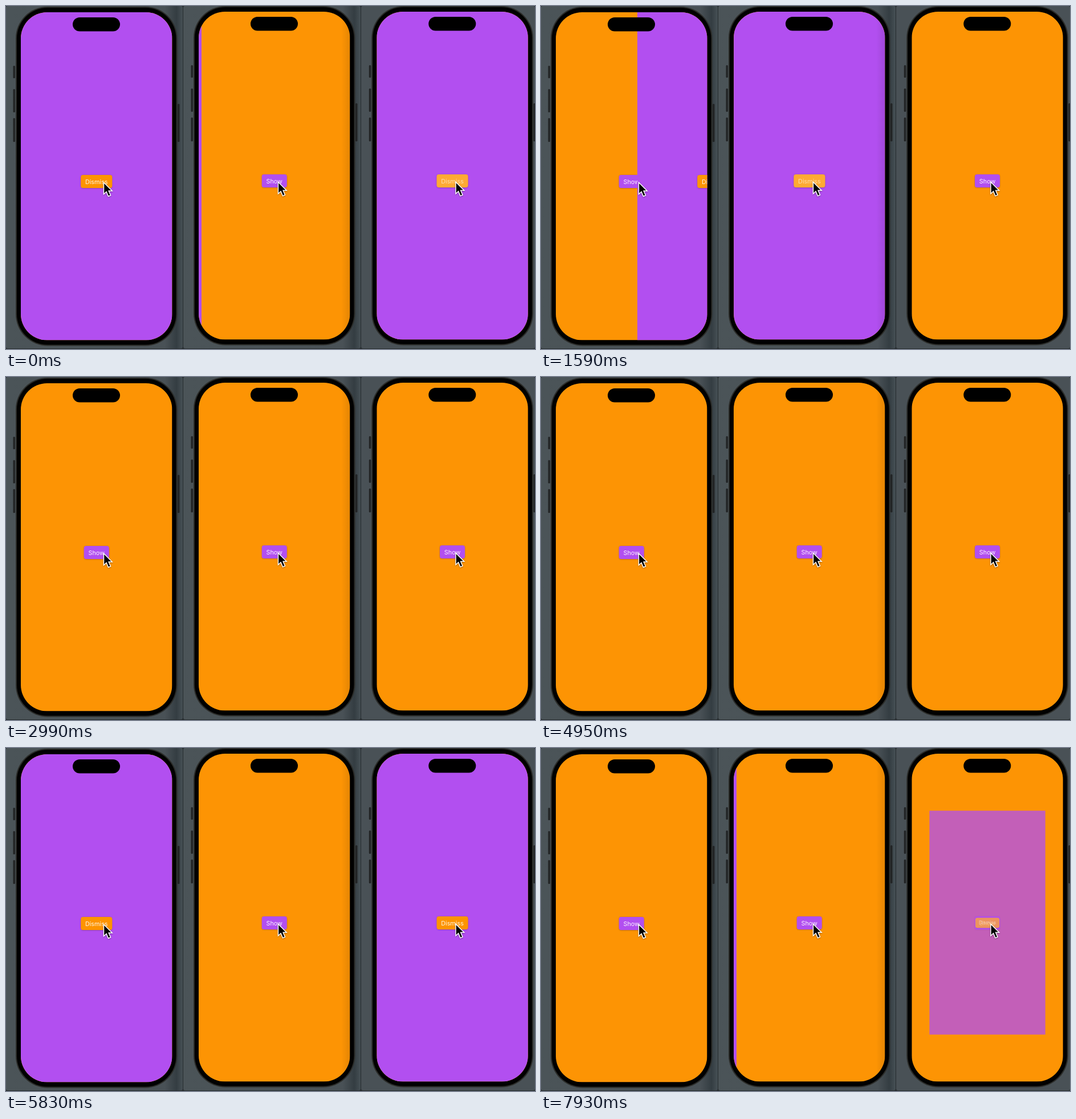
These frames come from a looping animation (928 px wide and 603 px high, 8 s). An HTML page:

```html
<!DOCTYPE html>
<html lang="en">
<head>
<meta charset="utf-8">
<title>View transitions</title>
<style>
  html, body { margin: 0; width: 100%; height: 100%; overflow: hidden; background: #495156; }
  svg { display: block; width: 928px; height: 603px; }
  text { font: 400 10.8px Inter, "Liberation Sans", sans-serif; fill: #fff; text-anchor: middle; }
</style>
</head>
<body>
<svg id="stage" viewBox="0 0 928 603">
  <defs>
    <linearGradient id="wall">
      <stop offset="0" stop-color="#4b5458"/>
      <stop offset=".9" stop-color="#495156"/>
      <stop offset=".965" stop-color="#343d42"/>
      <stop offset="1" stop-color="#465055"/>
    </linearGradient>
    <linearGradient id="edge">
      <stop offset="0" stop-opacity="0"/>
      <stop offset="1" stop-opacity=".1"/>
    </linearGradient>
    <clipPath id="screen"><rect x="26" y="11" width="265.5" height="576.5" rx="46"/></clipPath>
    <filter id="soft" x="-50%" y="-50%" width="200%" height="200%">
      <feDropShadow dx="0" dy="1" stdDeviation="1" flood-opacity=".4"/>
    </filter>
    <filter id="lift" x="-20%" y="-30%" width="140%" height="170%">
      <feDropShadow dx="0" dy=".5" stdDeviation=".8" flood-opacity=".3"/>
    </filter>
  </defs>
</svg>
<script>
const LOOP = 8000, RESTART = 650, DURATION = 350;
const ORANGE = '#fd9404', PURPLE = '#b24ff0';
const SCREEN = { x: 26, y: 11, w: 265.5, h: 576.5 };
const SAFE = { y: 51, h: 514 };
const CENTER = { x: 158.75, y: 308 };

// Taps: [time, shown afterwards]
const phones = [
  { x: 0, y: 0, cursor: 171.5, kind: 'move', taps: [[1406, 0], [4990, 1], [6998, 0]] },
  { x: 312, y: -1, cursor: 165.5, kind: 'slide', taps: [[1585, 0]] },
  { x: 624.3, y: -1, cursor: 164.7, kind: 'fade', taps: [[10, 0], [5251, 1], [7820, 0]] },
];
const stage = document.getElementById('stage');

function add(parent, tag, attrs, label) {
  const node = document.createElementNS('http://www.w3.org/2000/svg', tag);
  set(node, attrs);
  if (label) node.textContent = label;
  return parent.appendChild(node);
}
function set(node, attrs) {
  for (const key in attrs) node.setAttribute(key, attrs[key]);
}
function box(parent, x, y, width, height, fill, rx = 0, more = {}) {
  return add(parent, 'rect', { x, y, width, height, fill, rx, ...more });
}

function makeButton(parent, label, width, color) {
  const x = CENTER.x - width / 2;
  box(parent, x, 297, width, 23, color, 4, { filter: 'url(#lift)' });
  const glow = box(parent, x, 297, width, 23, '#fff', 4);
  const text = add(parent, 'text', { x: CENTER.x, y: 312.5 }, label);
  return level => {
    set(glow, { opacity: 0.2 * level });
    set(text, { opacity: 0.92 - 0.3 * level });
  };
}

function makePhone(phone, index) {
  const left = [0, 311, 623][index], width = [310, 311, 305][index];
  box(stage, left, 0, width, 602, index < 2 ? 'url(#wall)' : '#495156', 3);
  const g = add(stage, 'g', { transform: `translate(${phone.x} ${phone.y})` });
  for (const [x, y, h] of [[12.5, 105, 22], [12.5, 146, 41], [12.5, 197, 42], [301, 172, 67]])
    box(g, x, y, 3.5, h, '#222425', 1.5);
  box(g, 17, 1, 283.5, 596.5, '#2b2c29', 56);
  box(g, 19, 3, 279.5, 592.5, '#000', 54);

  const view = add(g, 'g', { 'clip-path': 'url(#screen)' });
  box(view, SCREEN.x, SCREEN.y, SCREEN.w, SCREEN.h, ORANGE);
  phone.pressShow = makeButton(view, 'Show', 44, PURPLE);
  phone.sheet = add(view, 'g', {});
  phone.back = box(phone.sheet, SCREEN.x, SCREEN.y, SCREEN.w, SCREEN.h, PURPLE);
  phone.pressDismiss = makeButton(phone.sheet, 'Dismiss', 55, ORANGE);
  if (phone.kind === 'slide') box(view, 276, 11, 16, 577, 'url(#edge)');

  box(g, 117, 20, 83, 24.5, '#000', 12.25);
  add(g, 'path', {
    d: 'M0 0V20.5L4.6 16.2L8 24.3L12 22.6L8.6 14.8H14.7Z',
    transform: `translate(${phone.cursor} ${310.5 - (phone.y ? 0 : 0.3)})`,
    fill: '#000', stroke: '#fff', 'stroke-width': 1.4, filter: 'url(#soft)',
  });
}

const ease = p => p * p * (3 - 2 * p);
const clamp = v => Math.max(0, Math.min(1, v));

// Uneven cadence: two short frames, then a long one
function snap(t) {
  if (t < RESTART) return t;
  const phase = (t - 50) % 140;
  return t - phase + (phase < 20 ? 0 : phase < 40 ? 20 : 40);
}

function pressed(dt) {
  return dt < -35 ? 0 : clamp(1 - (dt - 110) / 80);
}

function pose(phone, t) {
  let shown = 1 - phone.taps[0][1], leaving = false;
  const press = [0, 0];
  for (const [start, target] of phone.taps) {
    const dt = t - start;
    const which = target ? 0 : 1;
    press[which] = Math.max(press[which], pressed(dt));
    if (dt < 0) continue;
    const p = ease(clamp(dt / DURATION));
    shown = target ? p : 1 - p;
    leaving = !target;
  }
  let dx = 0, opacity = 1, scale = 1, back = { y: SCREEN.y, height: SCREEN.h };
  if (phone.kind === 'move') dx = (1 - shown) * SCREEN.w;
  if (phone.kind === 'slide') {
    const peeking = t < RESTART || t > 6700;
    dx = peeking ? 5 - SCREEN.w : (1 - shown) * SCREEN.w;
  }
  if (phone.kind === 'fade') {
    opacity = shown;
    if (leaving) {
      scale = shown;
      if (shown < 1) back = { y: SAFE.y, height: SAFE.h };
    }
  }
  const { x, y } = CENTER;
  set(phone.sheet, {
    transform: `translate(${dx + x * (1 - scale)} ${y * (1 - scale)}) scale(${scale})`,
    opacity,
  });
  set(phone.back, back);
  phone.pressShow(press[0]);
  phone.pressDismiss(press[1]);
}

box(stage, 0, 0, 928, 603, '#242a2d');
phones.forEach(makePhone);

const begin = performance.now();
function draw() {
  const t = snap((performance.now() - begin) % LOOP);
  phones.forEach(phone => pose(phone, t));
  requestAnimationFrame(draw);
}
draw();
</script>
</body>
</html>
```
